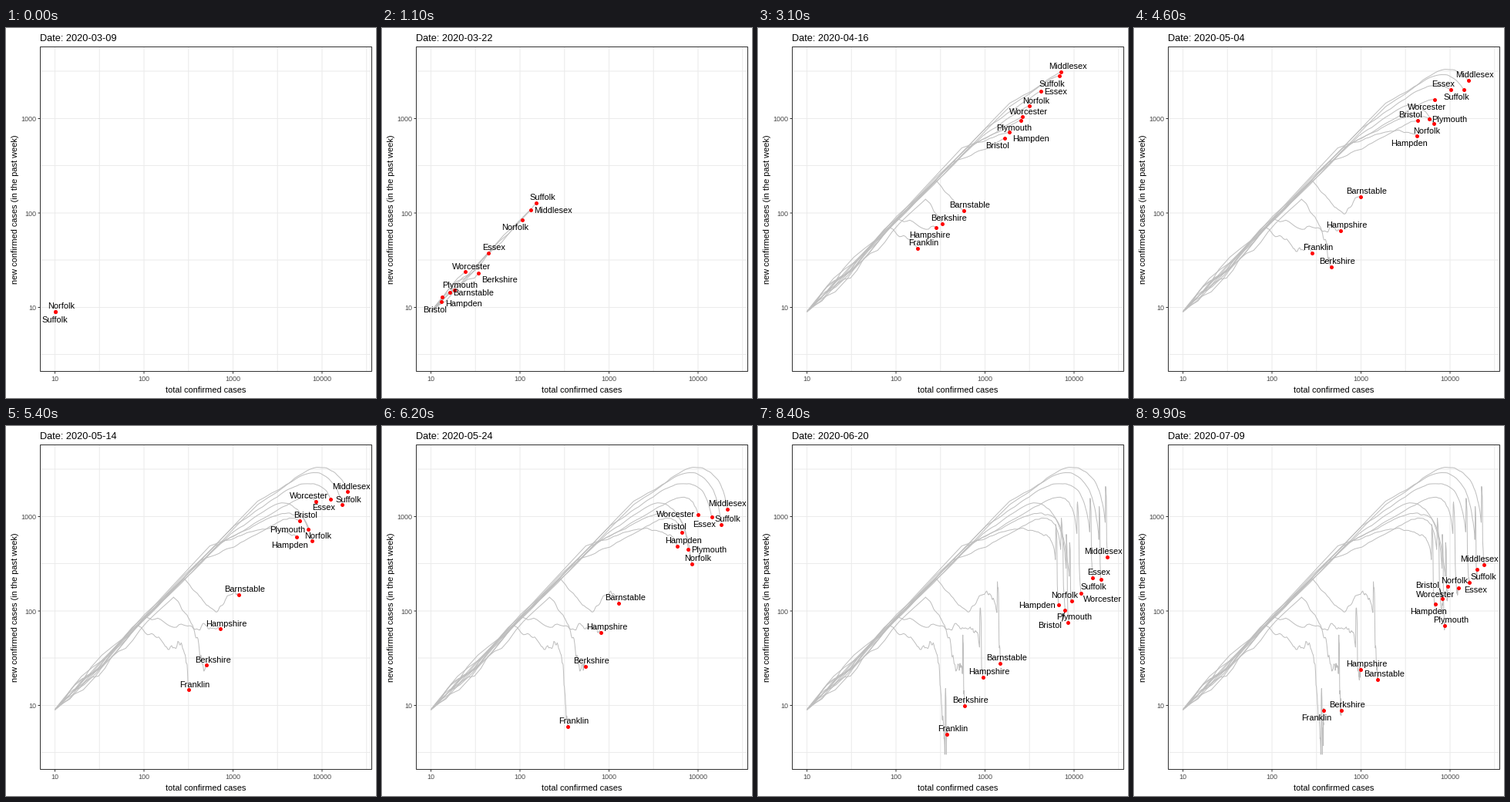
Recreate the animation shown at these times as a matplotlib script. Size 480 by 480 pixels, loop 10 s.

```python
import numpy as np
import matplotlib
import matplotlib.pyplot as plt
from matplotlib.animation import FuncAnimation
from matplotlib.patches import Rectangle

matplotlib.rcParams["font.family"] = "Liberation Sans"

SIZE, DPI, FRAMES = 480, 80, 100
PX = 72 / DPI  # points per pixel
LAST = FRAMES - 1
DAY = LAST / 122  # frames per day
DATE0 = np.datetime64("2020-03-09")
L, R, T, B = 44.5, 474.5, 24.5, 445.5  # panel edges
ORIGIN = 63.5, 368  # where every county enters
KEYS = np.array([19, 31, 46, 62, 84, 99])
rng = np.random.default_rng(7)

# Entry time, x at the first, third and last key, y at every key.
COUNTIES = {
    "Norfolk": (0, (291.5, 388.5, 407.5), (140, 101, 123.5, 178.5, 226.5, 207.5)),
    "Suffolk": (0, (326.5, 427.5, 445.5), (97.5, 62, 79.5, 128, 198.5, 185.5)),
    "Middlesex": (1, (326.5, 433.5, 454.5), (102, 56.5, 67.5, 107.5, 169.5, 179.5)),
    "Essex": (6, (296.5, 410.5, 435.5), (129, 82, 80, 117.5, 196.5, 202.5)),
    "Worcester": (8, (274.5, 389.5, 421.5), (154.5, 115, 92.5, 114.5, 216.5, 209.5)),
    "Plymouth": (9, (270, 382.5, 403.5), (156, 119.5, 117.5, 159.5, 254.5, 258.5)),
    "Hampden": (10, (264.5, 366.5, 391.5), (155.5, 135, 139.5, 155.5, 231.5, 230.5)),
    "Bristol": (10, (251.5, 367.5, 401.5), (175, 143, 119.5, 137.5, 238.5, 223.5)),
    "Barnstable": (9, (231.5, 293.5, 317.5), (198, 236.5, 218.5, 229.5, 307.5, 328.5)),
    "Berkshire": (4, (217.5, 255.5, 269.5), (222, 253.5, 309.5, 311.5, 362.5, 368.5)),
    "Hampshire": (12, (180.5, 267.5, 294.5), (248, 258.5, 262.5, 267.5, 325.5, 315.5)),
    "Franklin": (13, (171.5, 230.5, 246.5), (259, 286, 291.5, 389.5, 399.5, 368.5)),
}


def hermite(t, ks, vs):
    """Smooth curve through the key values."""
    ks, vs = np.array(ks, float), np.array(vs, float)
    m = np.gradient(vs, ks)
    i = np.clip(np.searchsorted(ks, t, side="right") - 1, 0, len(ks) - 2)
    h = ks[i + 1] - ks[i]
    u = (t - ks[i]) / h
    blend = u * u * (3 - 2 * u)
    return (vs[i] + (vs[i + 1] - vs[i]) * blend
            + h * u * (1 - u) * ((1 - u) * m[i] - u * m[i + 1]))


def course(start, xs, ys):
    """Times and positions: straight growth, then saturating totals."""
    t = np.union1d(np.arange(start, LAST, DAY), KEYS)
    late = t >= KEYS[0]
    u = ((t - start) / (KEYS[0] - start)).clip(0, 1) ** 1.2
    x = ORIGIN[0] + (xs[0] - ORIGIN[0]) * u
    y = ORIGIN[1] + (ys[0] - ORIGIN[1]) * u

    gap, left = xs[2] - xs[0], (xs[2] - xs[1]) / (xs[2] - xs[0])
    age = (t[late] - KEYS[0]) / (KEYS[2] - KEYS[0])
    x[late] = xs[2] - gap * left ** (age ** 1.1)
    y[late] = hermite(t[late], KEYS, ys)

    # One week of backlog in early June lifts every county.
    y -= 50 * np.interp(t, [68, 69, 73.5, 75.5], [0, 1, 1, 0])

    # Counting noise grows as the counts shrink; it rests at the keys.
    count = 10 ** ((485 - y) / 122.5)
    near = abs(t[:, None] - np.append(KEYS, start)).min(axis=1)
    noise = np.convolve(rng.normal(0, 1, len(t)), [0.5, 0.7, 0.5], "same")
    y += 22 / np.sqrt(count) * noise * (near / 3).clip(0, 1)
    return t, x, y.clip(T, 426)


fig = plt.figure(figsize=(SIZE / DPI, SIZE / DPI), dpi=DPI, facecolor="white")
ax = fig.add_axes([0, 0, 1, 1])
ax.set_xlim(0, SIZE)
ax.set_ylim(SIZE, 0)
ax.axis("off")


def seg(xs, ys, color, z):
    return ax.plot(xs, ys, color=color, lw=PX, zorder=z, snap=False,
                   solid_capstyle="butt")[0]


def text(x, y, s, px, color="black", **kw):
    kw = {"ha": "center", "va": "baseline", "zorder": 8, **kw}
    return ax.text(x, y, s, fontsize=px * PX, color=color, **kw)


for k in range(4):
    gx, gy = 63.5 + 115.5 * k, 362.5 - 122.5 * k
    seg([gx, gx], [T, B], "#EBEBEB", 1)
    seg([gx + 57.75] * 2, [T, B], "#EBEBEB", 1)
    seg([L, R], [gy + 61] * 2, "#EBEBEB", 1)
    seg([gx, gx], [B, B + 3], "#333333", 6)
    text(gx, 458.5, 10 ** (k + 1), 9, "#4D4D4D")
    if k < 3:
        seg([L, R], [gy, gy], "#EBEBEB", 1)
        seg([L - 3, L], [gy, gy], "#333333", 6)
        text(39.5, gy + 3.5, 10 ** (k + 1), 9, "#4D4D4D", ha="right")
ax.add_patch(Rectangle((L, T), R - L, B - T, fill=False, ec="#333333",
                       lw=PX, zorder=6, snap=False))
text(259, 473, "total confirmed cases", 11)
text(17, 235, "new confirmed cases (in the past week)", 11,
     rotation=90, va="center", ha="right")
title = text(43.5, 17, "", 12.7, ha="left")


class County:
    def __init__(self, name, spec):
        self.t, self.x, self.y = course(*spec)
        self.line = seg([], [], "#BEBEBE", 2)
        self.dot, = ax.plot([], [], "o", color="red", ms=5 * PX, mew=0,
                            zorder=4, snap=False)
        self.leader = seg([], [], "black", 3)
        self.label = text(0, 0, name, 11)
        self.half = self.label.get_window_extent(fig.canvas.get_renderer()).width / 2
        self.parts = self.line, self.dot, self.leader, self.label

    def move(self, t):
        self.pos = np.interp(t, self.t, self.x), np.interp(t, self.t, self.y)
        past = self.t < t
        self.line.set_data(np.append(self.x[past], self.pos[0]),
                           np.append(self.y[past], self.pos[1]))
        self.dot.set_data([self.pos[0]], [self.pos[1]])

    def spots(self):
        """Possible label centres, best first."""
        side = self.half + 4
        shifts = [(8, -7.5), (-9, 9.5), (8, 9.5), (-9, -7.5), (side, 0), (-side, 0)]
        shifts += [(sx * side, sy) for sy in (-7, 8, -18, 20) for sx in (-1, 1)]
        for dx, dy in shifts:
            yield (np.clip(self.pos[0] + dx, L + self.half + 2, R - self.half - 2),
                   np.clip(self.pos[1] + dy, T + 7, B - 7))

    def place(self, taken, dots):
        """Take the spot that hides the fewest labels and dots."""
        def cost(item):
            rank, (cx, cy) = item
            total = rank
            for ox, oy, half in taken:
                w = self.half + half - abs(cx - ox)
                h = 10 - abs(cy - oy)
                total += max(w, 0) * max(h, 0)
            for x, y in dots:
                total += 40 * (abs(x - cx) < self.half + 2 and abs(y - cy) < 6)
            return total

        cx, cy = min(enumerate(self.spots()), key=cost)[1]
        taken.append((cx, cy, self.half))
        self.label.set_position((cx, cy + 4))
        x, y = self.pos
        ex = np.clip(x, cx - self.half, cx + self.half)
        ey = np.clip(y, cy - 5, cy + 5)
        self.leader.set_visible(np.hypot(ex - x, ey - y) > 8)
        self.leader.set_data([x, ex], [y, ey])


counties = [County(*item) for item in COUNTIES.items()]


def update(i):
    title.set_text(f"Date: {DATE0 + int(i / DAY + 1e-6)}")
    shown = [c for c in counties if i >= c.t[0]]
    for c in counties:
        for part in c.parts:
            part.set_visible(c in shown)
    for c in shown:
        c.move(i)
    taken, dots = [], [c.pos for c in shown]
    for c in shown:
        c.place(taken, dots)
    return []


anim = FuncAnimation(fig, update, frames=FRAMES, interval=100,
                     init_func=lambda: [], repeat=True, repeat_delay=0)
plt.show()
```
